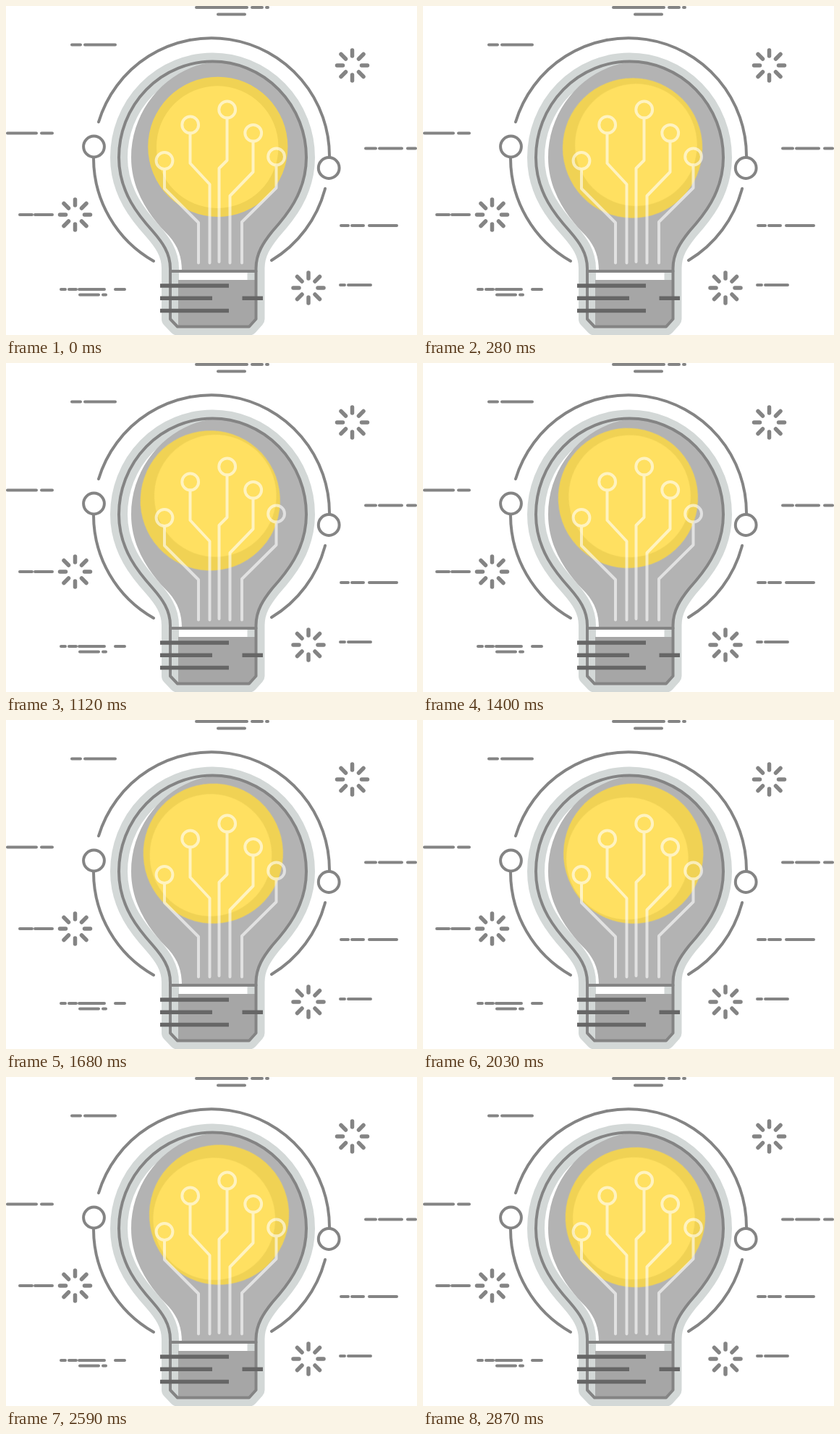
Recreate the animation shown at these times as an HTML page. Size 568 by 454 pixels, loop 2940 ms.

```html
<!DOCTYPE html>
<html lang="en">
<head>
<meta charset="utf-8">
<title>Light bulb</title>
<style>
  html, body { margin: 0; width: 100%; height: 100%; overflow: hidden; background: #fff; }
  svg { display: block; width: 568px; height: 454px; }
  .line { fill: none; stroke: #848484; stroke-width: 4; stroke-linecap: round; stroke-linejoin: round; }
  .ray { stroke-width: 5.5; }
  .halo { fill: #fff; stroke: #d3d8d7; stroke-width: 24; stroke-linejoin: round; }
  .band { fill: none; stroke: #666; stroke-width: 5.5; }
  .circuit { fill: none; stroke: #fff; stroke-width: 4; stroke-linecap: round; stroke-linejoin: round; opacity: .6; }
  .glow { transform-origin: 288.4px 190px; animation: orbit 2940ms steps(42, end) infinite; }
  .core { transform-origin: 288.5px 189.5px; animation: orbit 2940ms steps(42, end) infinite reverse; }
  /* stepping through a reversed timeline needs the opposite jump to start at rest */
  .core { animation-timing-function: steps(42, start); }
  @keyframes orbit { to { transform: rotate(360deg); } }
</style>
</head>
<body>
<svg viewBox="0 0 568 454">
  <defs>
    <path id="bulb" d="M227 366V362C227 341 216 326 203 311C185 291 156 258 156 209A129.5 132.5 0 0 1 415 209C415 258 386 291 368 311C356 326 345.5 341 345.5 362V432L336 442.5H237L227 432Z"/>
    <path id="burst" d="M13 0H21M-13 0H-21M0 13V21M0 -13V-21M9 9L15.5 15.5M-9 9L-15.5 15.5M9 -9L15.5 -15.5M-9 -9L-15.5 -15.5"/>
  </defs>

  <!-- speed lines -->
  <path class="line" d="M263 2H333M340 2H354M360 2H362M293 11.5H330
    M91 53.5H103M109 53.5H151M2 175.5H42M49 175.5H64
    M497 196.5H511M516 196.5H547M555 196.5H566
    M19 288H36M40 288H64M463 303H473M478 303H494M502 303H540
    M462 385H468M473 385H504M76 391H82M87 391H97M101 391H136M151 391H164
    M102 398.5H128M134 398.5H138"/>
  <g class="line ray">
    <use href="#burst" x="478.5" y="82"/>
    <use href="#burst" x="95.5" y="288"/>
    <use href="#burst" x="418" y="389"/>
  </g>

  <!-- orbit ring -->
  <g class="line">
    <path d="M128 160A163 163 0 0 1 447 209M121 209A163.5 163.5 0 0 0 204 352M441 252A163.5 163.5 0 0 1 367 351"/>
    <circle cx="121.5" cy="194" r="14.4"/>
    <circle cx="446.2" cy="223.5" r="14.4"/>
  </g>

  <!-- glass and socket -->
  <use href="#bulb" class="halo"/>
  <path fill="#b3b3b3" d="M290 77C226 82 173 140 173 209C173 260 205 297 225 317C238 332 243 346 243 366H345.5V362C345.5 341 356 326 368 311C386 291 415 258 415 209A129.5 132.5 0 0 0 290 77Z"/>
  <path fill="#a6a6a6" d="M238 378H345.5V432L336 442.5H238Z"/>
  <use href="#bulb" class="line"/>
  <path class="line" d="M227 366H345.5"/>
  <path class="band" d="M213 386H308M213 403.3H285M326.5 403.3H355M213 420.5H308"/>

  <!-- light -->
  <circle class="glow" cx="292.8" cy="194.3" r="96.6" fill="#f0d254"/>
  <circle class="core" cx="292.2" cy="194.6" r="84.3" fill="#ffe061"/>

  <g class="circuit">
    <path d="M219 225V252L266 299V354.5M254.5 175.5V217L281.5 246V354.5M305.5 154.5V213L294.5 224V353M341.5 186.5V229L309.5 262V354.5M373.5 219.5V251L326 298V354.5"/>
    <circle cx="219" cy="213.5" r="11.4"/>
    <circle cx="254.7" cy="164" r="11.4"/>
    <circle cx="305.7" cy="143" r="11.4"/>
    <circle cx="341.7" cy="175.3" r="11.4"/>
    <circle cx="373.6" cy="208" r="11.4"/>
  </g>
</svg>
</body>
</html>
```
